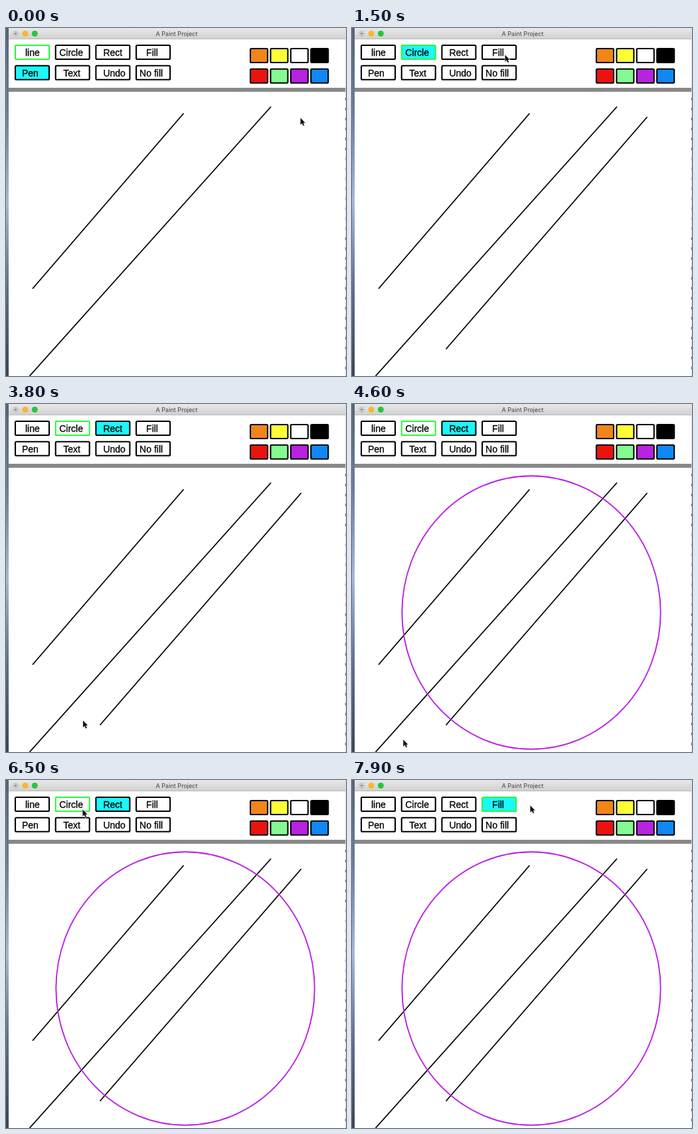
An HTML page with a canvas that plays this animation: 512x524 px, repeating every 8 s.

```html
<!DOCTYPE html>
<html lang="en">
<head>
<meta charset="utf-8">
<title>A Paint Project</title>
<style>
html, body { margin: 0; width: 100%; height: 100%; overflow: hidden; background: #fff; }
canvas { display: block; }
</style>
</head>
<body>
<canvas id="stage" width="512" height="524"></canvas>
<script>
const ctx = document.getElementById('stage').getContext('2d');
const LOOP = 8000, STEP = 100, COLUMNS = 4;
const PURPLE = '#b822e2';

// label: text inset
const buttons = { line: 15, Circle: 5.5, Rect: 11, Fill: 15, Pen: 10, Text: 11.5, Undo: 11, 'No fill': 5 };
const swatches = ['#f28519', '#fffd36', '#fff', '#000', '#ec130e', '#84fa90', PURPLE, '#0f87f4'];

// [time, label]: holds until the next entry
const selected = [[0, 'line'], [1200, 'Circle'], [7500, 'Fill']];
const hovered = [[0, 'Pen'], [1100, 'Circle'], [1600, 'Rect'], [6600, 'Circle'], [6900, 'Rect'], [7200, 'Fill']];

// pointer moves, each eased: [start, end, x, y]
const moves = [
  [0, 500, 141, 485],      // drag a line
  [600, 1100, 103, 41],    // to Circle
  [1300, 1500, 230, 40],
  [1500, 1900, 446, 72],   // to purple
  [2400, 2700, 482, 95],
  [2700, 3000, 465, 109],
  [3000, 4000, 75, 519],   // drag an ellipse
  [4500, 5000, 92, 384],
  [5600, 6500, 115, 44],
  [6500, 7200, 228, 41],   // to Fill
  [7800, 7900, 268, 38]
];

const valueAt = (track, t) => track.filter(([start]) => start <= t).pop()[1];

function pointerAt(t) {
  let x = 443, y = 135;
  for (const [start, end, toX, toY] of moves) {
    const k = Math.min(1, Math.max(0, (t - start) / (end - start)));
    const eased = k * k * (3 - 2 * k);
    x += (toX - x) * eased;
    y += (toY - y) * eased;
  }
  return [x, y];
}

function fillRect(x, y, w, h, color) {
  ctx.fillStyle = color;
  ctx.fillRect(x, y, w, h);
}

function gradient(height, ...colors) {
  const g = ctx.createLinearGradient(0, 0, 0, height);
  colors.forEach((c, i) => g.addColorStop(i / (colors.length - 1), c));
  return g;
}

function stroke(color, width) {
  ctx.strokeStyle = color;
  ctx.lineWidth = width;
  ctx.stroke();
}

function box(x, y, w, fill, border) {
  ctx.beginPath();
  ctx.roundRect(x, y, w, 21, 1.5);
  ctx.fillStyle = fill;
  ctx.fill();
  stroke(border, 2.1);
}

function dot(x, r, color) {
  ctx.beginPath();
  ctx.arc(x, 8.5, r, 0, 2 * Math.PI);
  ctx.fillStyle = color;
  ctx.fill();
}

function line(x0, y0, x1, y1) {
  ctx.beginPath();
  ctx.moveTo(x0, y0);
  ctx.lineTo(x1, y1);
  stroke('#000', 1.8);
}

function drawWindow() {
  fillRect(0, 0, 512, 524, '#fff');
  fillRect(0, 0, 4, 524, gradient(524, '#566476', '#6a7f97', '#a3bad2', '#5c6f88', '#3a4556'));
  fillRect(4, 0, 507, 17, gradient(17, '#e8e8e8', '#cfcfcf'));
  fillRect(4, 16, 507, 1, '#b9b9b9');

  // sliver of the code window behind the right edge
  fillRect(511, 0, 1, 524, '#dedede');
  for (let y = 105; y < 520; y += 15) fillRect(511, y, 1, 4, y > 190 && y < 310 ? '#b58ac4' : '#555');

  dot(14.5, 4.5, '#c9c9c9');
  dot(14.5, 1.2, '#777');
  dot(29, 4.5, '#f6b82c');
  dot(43.3, 4.5, '#2bc440');
  ctx.fillStyle = '#444';
  ctx.font = '9.1px Inter, sans-serif';
  ctx.textAlign = 'center';
  ctx.fillText('A Paint Project', 257, 12);
  fillRect(4, 90, 507, 6, '#888');
}

function drawToolbar(t) {
  const active = valueAt(selected, t), hover = valueAt(hovered, t);
  ctx.textAlign = 'left';
  ctx.font = '14px "Liberation Sans", Arial, sans-serif';
  Object.entries(buttons).forEach(([label, inset], i) => {
    const x = 14 + (i % COLUMNS) * 60.7, y = i < COLUMNS ? 26 : 56.7;
    box(x, y, 51, label === hover ? '#1cf7fc' : '#fff', label === active ? '#2cf53c' : '#000');
    ctx.fillStyle = '#000';
    ctx.fillText(label, x + inset, y + 16);
    ctx.strokeStyle = '#000';
    ctx.lineWidth = 0.3;
    ctx.strokeText(label, x + inset, y + 16);
  });
  swatches.forEach((color, i) =>
    box(368 + (i % COLUMNS) * 30.4, i < COLUMNS ? 31 : 61.7, 26, color, '#000'));
}

function drawShapes(t) {
  line(267.5, 128.5, 40, 392.5);
  line(399, 118.5, 35.5, 524);
  if (t >= 600) line(444.5, 134, 141.5, 483.5);
  if (t >= 4400) {
    ctx.beginPath();
    ctx.ellipse(270, 314, 194.7, 205.7, 0, 0, 2 * Math.PI);
    stroke(PURPLE, 1.9);
  }
}

function drawPointer(t) {
  const [x, y] = pointerAt(t);
  const arrow = new Path2D('M0 0V10L2.3 7.9L4 11.6L5.7 10.8L4.1 7.2H7Z');
  ctx.save();
  ctx.translate(x + 0.5, y + 0.5);
  ctx.strokeStyle = '#e4e4e4';
  ctx.lineWidth = 1.4;
  ctx.stroke(arrow);
  ctx.fillStyle = '#111';
  ctx.fill(arrow);
  ctx.restore();
}

function render(now) {
  const t = Math.floor((now % LOOP) / STEP) * STEP;
  drawWindow();
  drawToolbar(t);
  drawShapes(t);
  drawPointer(t);
  requestAnimationFrame(render);
}
render(performance.now());
</script>
</body>
</html>
```
